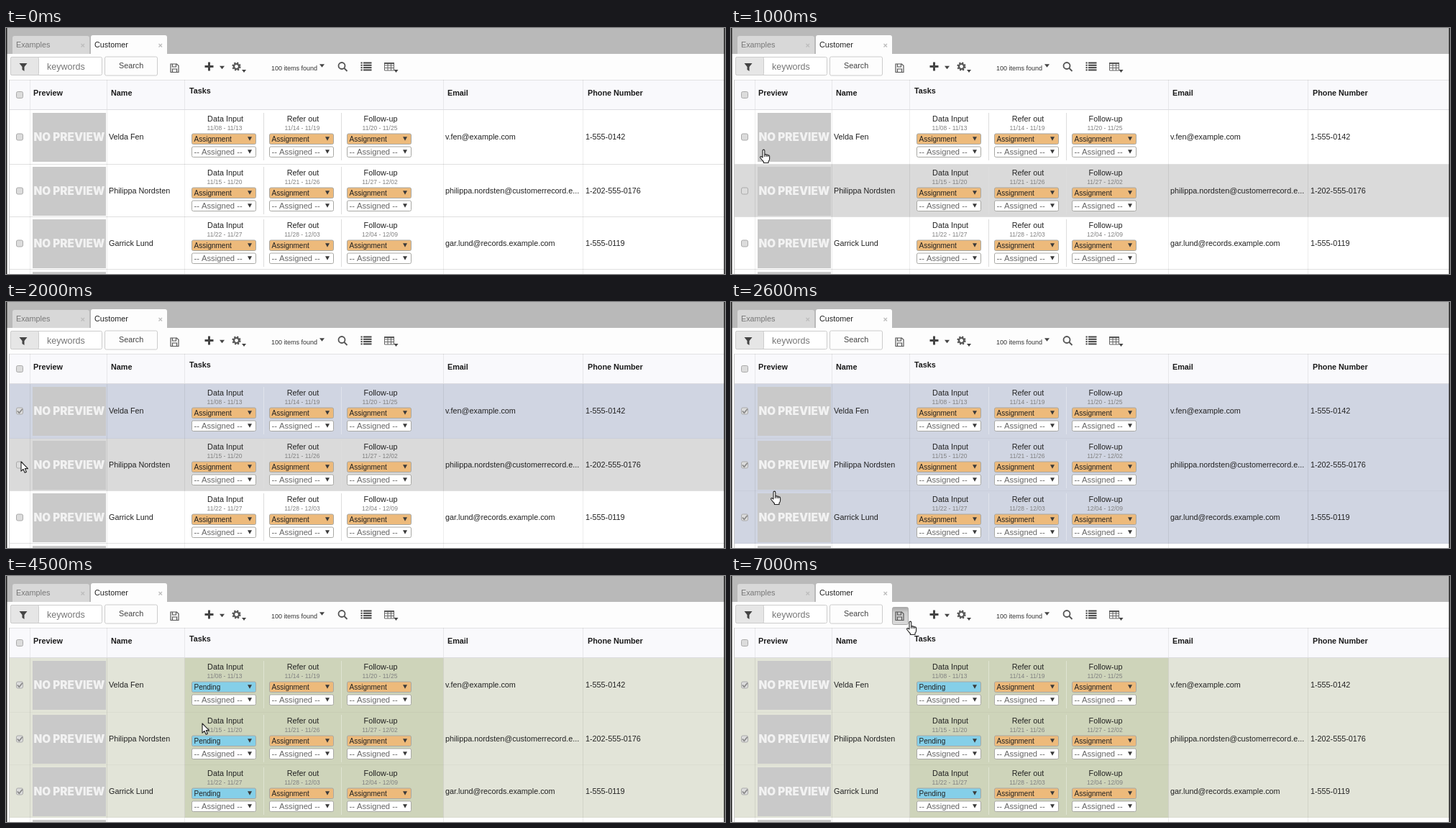
Write an HTML page with a canvas that moves like this. It is 1000x342 px and loops after 7.2 s.

```html
<!DOCTYPE html>
<html lang="en">
<head>
<meta charset="utf-8">
<title>Bulk status change</title>
<style>
html, body { margin: 0; height: 100%; overflow: hidden; background: #fff; }
canvas { display: block; }
</style>
</head>
<body>
<canvas id="stage" width="1000" height="342"></canvas>
<script>
const ctx = document.getElementById('stage').getContext('2d');
const LOOP = 7200, STEP = 100;
const OPEN = 3600, APPLIED = 4400, SAVE = 5000;

const rows = [
  { mid: 151, top: 114, end: 190, picked: 1500, name: 'Velda Fen', mail: 'v.fen@example.com',
    phone: '1-555-0142', dates: ['11/08 - 11/13', '11/14 - 11/19', '11/20 - 11/25'] },
  { mid: 226, top: 190, end: 263, picked: 2100, name: 'Philippa Nordsten', mail: 'philippa.nordsten@customerrecord.e...',
    phone: '1-202-555-0176', dates: ['11/15 - 11/20', '11/21 - 11/26', '11/27 - 12/02'] },
  { mid: 299, top: 263, end: 336, picked: 2400, name: 'Garrick Lund', mail: 'gar.lund@records.example.com',
    phone: '1-555-0119', dates: ['11/22 - 11/27', '11/28 - 12/03', '12/04 - 12/09'] }
];
const tasks = ['Data Input', 'Refer out', 'Follow-up'];
const statuses = ['-- Status --', 'Assignment', 'Waiting', 'Pending', 'In Progress', 'Need Assistance', 'Escalated',
  'Revise', 'Reject', 'Review', 'Complete', 'Approved', 'Not Required'];
const columns = [[38, 'Preview'], [146, 'Name'], [255, 'Tasks'], [614, 'Email'], [809, 'Phone Number']];

// Pointer path: time, x, y
const path = [[400, 160, 340], [700, 112, 240], [900, 78, 200], [1000, 45, 169], [1300, 23, 146], [1700, 23, 146],
  [2000, 21, 222], [2200, 21, 222], [2400, 21, 296], [2500, 24, 292], [2600, 60, 263], [2900, 160, 200],
  [3400, 273, 156], [3600, 273, 156], [3800, 273, 180], [4200, 273, 205], [4500, 273, 205],
  [4800, 260, 120], [5100, 238, 57], [5300, 249, 63]];

const ARROW = new Path2D('M0 0V13.2L3 10.4L5.2 15.3L7.4 14.3L5.3 9.6H9.5Z');
const HAND = new Path2D('M-1 11V1.5a1.4 1.4 0 0 1 2.8 0V7q1.3-1 2.4.3 1.2-.7 2.2.5 2.2-.2 2.2 2V13q0 2-1.6 3.5V18.5' +
  'H.4V17Q-2 14.5-4.4 11.2q-.2-2 1.6-1.4Z');
const FINGERS = new Path2D('M1.8 7V10M4.2 7.5V10M6.4 8V10');

function text(s, x, y, { size = 10.8, color = '#222', weight = 400, align = 'left', font = 'Liberation Sans' } = {}) {
  ctx.font = `${weight} ${size}px "${font}", Arial, sans-serif`;
  ctx.textAlign = align;
  ctx.fillStyle = color;
  ctx.fillText(s, x, y + size * .36);
}

function rect(x, y, w, h, color) {
  ctx.fillStyle = color;
  ctx.fillRect(x, y, w, h);
}

function box(x, y, w, h, fill, stroke, r = 2) {
  ctx.beginPath();
  ctx.roundRect(x + .5, y + .5, w - 1, h - 1, r);
  ctx.fillStyle = fill;
  ctx.fill();
  if (stroke) line(stroke);
}

function line(color, width = 1, shape) {
  ctx.strokeStyle = color;
  ctx.lineWidth = width;
  shape ? ctx.stroke(new Path2D(shape)) : ctx.stroke();
}

function fill(shape, color) {
  ctx.fillStyle = color;
  ctx.fill(new Path2D(shape));
}

const caret = (x, y, half = 3.5, tall = 4.5, color = '#444') =>
  fill(`M${x - half} ${y - tall / 2}h${half * 2}l${-half} ${tall}z`, color);

function pointerAt(t) {
  if (t < path[0][0]) return null;
  const next = path.findIndex(p => p[0] > t);
  if (next < 0) return path.at(-1).slice(1);
  const [t0, x0, y0] = path[next - 1], [t1, x1, y1] = path[next];
  const k = (t - t0) / (t1 - t0);
  return [x0 + (x1 - x0) * k, y0 + (y1 - y0) * k];
}

function drawTab(label, x, y, w, color, ink) {
  ctx.beginPath();
  ctx.roundRect(x, y, w, 37 - y, [3, 3, 0, 0]);
  ctx.fillStyle = color;
  ctx.fill();
  text(label, x + 5, 22.8, { color: ink });
  line('#bdbdbd', 1.3, `M${x + w - 11.5} 22l4.500 4.500m0-4.500l-4.500 4.500`);
}

function drawTabs() {
  rect(0, 0, 1000, 36, '#b9b9b9');
  drawTab('Examples', 9, 11, 107, '#d8d8d8', '#777');
  drawTab('Customer', 118, 10, 106, '#fdfdfd', '#222');
}

function drawToolbar(saveActive) {
  rect(0, 36, 1000, 36, '#fdfdfd');
  box(6, 40, 128, 26, '#fff', '#ccc');
  box(6, 40, 40, 26, '#e6e6e6', '#ccc');
  fill('M18.5 49h11l-4 5v6l-3-2v-4z', '#444');
  text('keywords', 57, 53, { size: 12.5, color: '#777' });
  box(137, 39.5, 74, 27, '#fdfdfd', '#ccc');
  text('Search', 157, 52.5, { color: '#444' });

  if (saveActive) {
    const shade = ctx.createLinearGradient(0, 43, 0, 68);
    shade.addColorStop(0, '#a4a4a4');
    shade.addColorStop(.3, '#cecece');
    shade.addColorStop(1, '#dadada');
    box(224, 43, 23, 25, shade, '#aaa');
  }
  line('#555', 1.2, 'M229 50h8.5l2.5 2.5v9h-11zM231.5 50v4h5v-4M231.5 61.5V57h6v4.5');

  line('#444', 3, 'M282.5 47.5v12M276.5 53.5h12');
  caret(300.5, 55);
  ctx.setLineDash([2.3, 1.63]);
  line('#555', 2.2, 'M325.5 53.5a5 5 0 1 1-10 0a5 5 0 1 1 10 0');
  ctx.setLineDash([]);
  line('#555', 2.2, 'M324 53.5a3.5 3.5 0 1 1-7 0a3.5 3.5 0 1 1 7 0');
  caret(331, 60, 3, 4);
  text('100 items found', 369, 55.5, { size: 9, color: '#333' });
  caret(439.5, 52.5);
  line('#555', 1.8, 'M471.5 52.5a4.5 4.5 0 1 1-9 0a4.5 4.5 0 1 1 9 0M470.5 56l4 4');
  for (let y = 47.5; y < 59; y += 3.3) {
    rect(493.5, y, 2.2, 2, '#444');
    rect(497, y, 11.5, 2, '#444');
  }
  line('#666', 1, 'M526.5 48.5h13v10.5h-13zM526.5 52h13M526.5 55.5h13M531 48.5v10.5M535.5 48.5v10.5');
  rect(526, 48, 14, 2, '#555');
  caret(542.5, 60, 3, 4);
}

function drawHeader() {
  rect(5, 72, 995, 41, '#f9f9fc');
  rect(5, 72, 995, 1, '#e2e2e4');
  for (const [x, label] of columns)
    text(label, x, label === 'Tasks' ? 87 : 90.5, { weight: 700, color: '#1a1a1a' });
  drawCheckbox(93, false);
}

function drawCheckbox(mid, checked) {
  box(14, mid - 5, 10, 10, '#dcdcdc', '#aaa');
  if (checked) line('#888', 1.7, `M15.8 ${mid}l2.5 2.7l4.5-5.5`);
}

function drawSelect(x, y, label, color, ink = '#222', size = 10) {
  box(x, y, 90, 15.5, color, '#a8a8a4');
  text(label, x + 3.5, y + 7.8, { size, color: ink });
  caret(x + 81, y + 7.6, 3, 5.5, '#3a3a3a');
}

function drawPreview(mid) {
  rect(37, mid - 33, 102, 68, '#c9c9c9');
  text('NO PREVIEW', 88, mid + .5, { size: 15.3, weight: 900, color: '#f2f2f2', align: 'center', font: 'Inter' });
}

function drawRow(row, t, hovered) {
  const { mid, top, end } = row;
  const picked = t >= row.picked, applied = t >= APPLIED;
  const tint = applied ? '#e2e4d8'
    : picked ? (hovered && t > 2600 ? '#b1b5c0' : '#d0d5e2')
    : hovered ? '#dadada' : '#fff';
  rect(5, top, 994, end - top, tint);
  if (applied) rect(249, top, 359, end - top, '#ced4ba');
  rect(5, end - 1, 994, 1, picked ? 'rgba(0,0,0,.03)' : '#e0e0e0');

  drawCheckbox(mid + .5, picked);
  drawPreview(mid);
  text(row.name, 143, mid);
  text(row.mail, 611, mid);
  text(row.phone, 806, mid);

  tasks.forEach((task, i) => {
    const x = 258 + 108 * i;
    const pending = applied && i === 0;
    text(task, x + 47, mid - 25, { align: 'center' });
    text(row.dates[i], x + 46, mid - 12, { size: 8.5, color: '#808080', align: 'center' });
    drawSelect(x, mid - 4.5, pending ? 'Pending' : 'Assignment', pending ? '#85cfe8' : '#edba7b');
    drawSelect(x, mid + 13.5, '-- Assigned --', '#fff', '#666', 11.2);
    if (i) rect(x - 8, mid - 33, 1, 66, picked ? 'rgba(255,255,255,.35)' : '#ddd');
  });
}

function drawList(y) {
  const pitch = 12.83, active = Math.max(1, Math.min(3, Math.floor((y - 162) / pitch)));
  rect(258, 162, 90, 168, '#8d8577');
  rect(259, 163, 88, 166, '#edba7b');
  statuses.forEach((label, i) => {
    const mid = 168.5 + i * pitch;
    if (i === active) rect(259, mid - 6.4, 88, pitch, '#1e90ff');
    text(label, 262, mid, { size: 10, color: i === active ? '#fff' : '#222' });
  });
}

function drawPointer([x, y]) {
  const hand = y < 72 || (x > 33 && x < 140);
  ctx.save();
  ctx.translate(x, y);
  ctx.lineJoin = 'round';
  ctx.fillStyle = '#fff';
  ctx.strokeStyle = '#222';
  ctx.lineWidth = 1.1;
  ctx.fill(hand ? HAND : ARROW);
  ctx.stroke(hand ? HAND : ARROW);
  if (hand) ctx.stroke(FINGERS);
  ctx.restore();
}

function draw(t) {
  const pointer = pointerAt(t), late = pointerAt(t - STEP);
  const open = t >= OPEN && t < APPLIED;
  rect(0, 0, 1000, 342, '#fff');
  drawTabs();
  drawToolbar(t >= SAVE);
  drawHeader();
  rows.forEach((row, i) => {
    const hovered = open ? i === 0 : late && late[1] >= row.top && late[1] < row.end;
    drawRow(row, t, hovered);
  });
  rect(37, 339, 102, 3, '#c9c9c9');
  for (const x of [33, 140, 248, 608, 802]) rect(x, 72, 1, 270, 'rgba(0,0,0,.07)');
  rect(5, 113, 994, 1, '#dcdce0');
  rect(4, 72, 1, 270, '#ccc');
  if (open) drawList(pointer[1]);
  if (pointer) drawPointer(pointer);
  rect(0, 0, 1.5, 342, '#222');
  rect(998.5, 0, 1.5, 342, '#222');
}

function tick() {
  const t = performance.now() % LOOP;
  draw(Math.floor(t / STEP) * STEP);
  requestAnimationFrame(tick);
}
tick();
</script>
</body>
</html>
```
